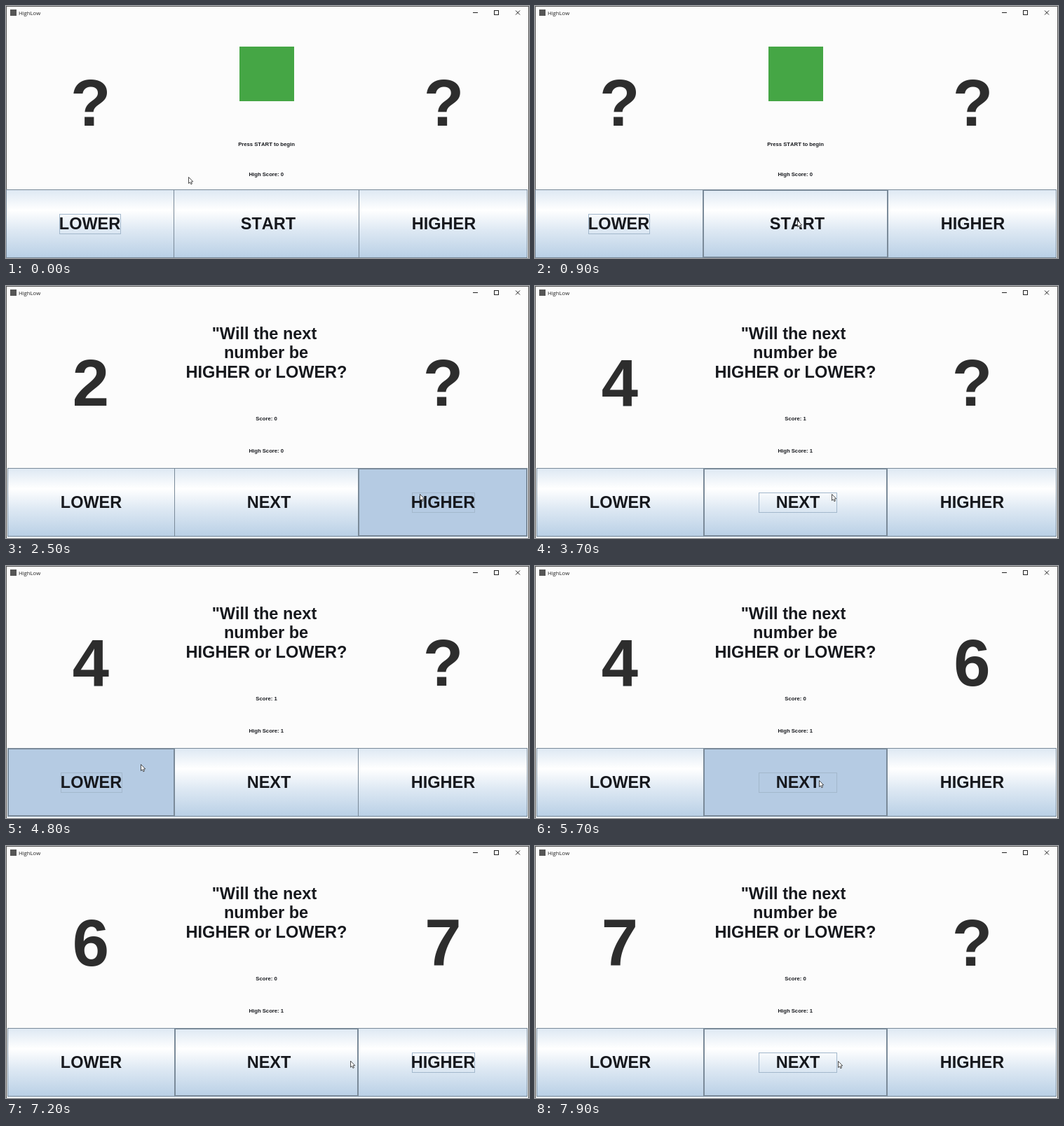
Recreate the animation shown at these times as an HTML page with a canvas. Size 746 by 360 pixels, loop 8000 ms.

```html
<!DOCTYPE html>
<html lang="en">
<head>
<meta charset="utf-8">
<title>HighLow</title>
<style>
html, body { margin: 0; width: 100%; height: 100%; overflow: hidden; background: #fcfcfc; }
canvas { display: block; }
</style>
</head>
<body>
<canvas id="stage" width="746" height="360"></canvas>
<script>
const ctx = document.getElementById('stage').getContext('2d');
const LOOP = 8000, INK = '#16181d', SANS = '"Liberation Sans", Arial, sans-serif';

// Pointer path: time, x, y of the tip
const path = [
  [0, 260, 244], [200, 260, 244], [800, 374, 306], [1100, 374, 306],
  [1600, 378, 63], [1750, 378, 63], [2300, 590, 297], [2650, 590, 297],
  [3250, 423, 297], [3800, 423, 297], [4500, 192, 283], [4950, 192, 283],
  [5550, 405, 306], [5850, 405, 306], [6300, 520, 307], [6550, 590, 306],
  [6850, 590, 306], [7450, 432, 307], [8000, 432, 307]
];

// Clicks: press time, release time, button index
const clicks = [
  [1000, 1100, 1], [2400, 2600, 2], [3400, 3500, 1], [4700, 4900, 0],
  [5700, 5800, 1], [6650, 6800, 2], [7550, 7650, 1]
];

// Game states: start time, left, right, score, high score
const states = [
  [0, '?', '?', 0, 0], [1100, '2', '?', 0, 0], [2600, '2', '4', 1, 1],
  [3500, '4', '?', 1, 1], [4900, '4', '6', 0, 1], [5800, '6', '?', 0, 1],
  [6800, '6', '7', 0, 1], [7650, '7', '?', 0, 1]
];

const layouts = {
  start: { top: 262, edges: [0, 239, 503, 744], mids: [119.5, 374, 624.5] },
  play: { top: 260, edges: [2, 240, 502, 744], mids: [121.5, 375, 623.5] }
};

const last = (list, t) => list.filter(item => item[0] <= t).pop();

function pointerAt(t) {
  const i = path.findIndex(p => p[0] > t);
  const [t0, x0, y0] = path[i - 1], [t1, x1, y1] = path[i];
  const u = (t - t0) / (t1 - t0), k = u * u * (3 - 2 * u);
  return [x0 + (x1 - x0) * k, y0 + (y1 - y0) * k];
}

function text(str, x, y, size, color = INK) {
  ctx.font = `bold ${size}px ${SANS}`;
  ctx.textAlign = 'center';
  ctx.fillStyle = color;
  ctx.fillText(str, x, y);
}

function box(x, y, w, h, color, line = 1) {
  ctx.strokeStyle = color;
  ctx.lineWidth = line;
  ctx.strokeRect(x + line / 2, y + line / 2, w - line, h - line);
}

function drawFrame() {
  ctx.fillStyle = '#fcfcfc';
  ctx.fillRect(0, 0, 746, 360);
  ctx.fillStyle = '#555';
  ctx.fillRect(0, 0, 746, 1);
  ctx.fillRect(0, 0, 1, 360);
  ctx.fillRect(745, 0, 1, 360);
  ctx.fillRect(6, 5, 9, 9);
  ctx.font = '7.7px "Open Sans", sans-serif';
  ctx.textAlign = 'left';
  ctx.fillStyle = '#222';
  ctx.fillText('HighLow', 18, 12.5);
  ctx.fillRect(666, 9, 7, 1);
  box(696, 6, 7, 7, '#222');
  ctx.beginPath();
  ctx.moveTo(727, 6.5);
  ctx.lineTo(733, 12.5);
  ctx.moveTo(733, 6.5);
  ctx.lineTo(727, 12.5);
  ctx.stroke();
}

function drawButton(i, label, layout, pressed, hover, focused) {
  const { top, edges, mids } = layout;
  const x = edges[i], w = edges[i + 1] - x + (i < 2 ? 1 : 0), h = 98.5;
  const fill = ctx.createLinearGradient(0, top, 0, top + h);
  [[0, '#dde8f3'], [0.3, '#ffffff'], [0.6, '#dde8f3'], [1, '#b8cfe5']]
    .forEach(stop => fill.addColorStop(...stop));
  ctx.fillStyle = pressed ? '#b5cbe3' : fill;
  ctx.fillRect(x, top, w, h);
  box(x, top, w, Math.floor(h), '#7a8a99', hover ? 2 : 1);
  if (focused) {
    const half = i === 1 ? 56 : i ? 45 : 44;
    box(Math.round(mids[i] - half), top + 35, half * 2, 29, '#a3b8cc');
  }
  text(label, mids[i], top + 57, 23.5);
}

function drawPointer(x, y) {
  const shape = [[0, 0], [0, 9], [2, 7.2], [3.4, 10.2], [4.9, 9.5], [3.6, 6.6], [6.2, 6.4]];
  ctx.beginPath();
  shape.forEach(([dx, dy]) => ctx.lineTo(x + 0.5 + dx, y + 0.5 + dy));
  ctx.closePath();
  ctx.fillStyle = '#fff';
  ctx.fill();
  ctx.strokeStyle = '#222';
  ctx.lineWidth = 0.8;
  ctx.stroke();
}

function draw(t) {
  const [, left, right, score, high] = last(states, t);
  const started = t >= 1100;
  const layout = started ? layouts.play : layouts.start;
  const [px, py] = pointerAt(t);
  const click = last(clicks, t);
  const focus = click ? click[2] : 0;
  const down = click && t < click[1];

  drawFrame();
  text(left, 120.8, 171, 94, '#2d2d2d');
  text(right, started ? 623.5 : 624.5, 171, 94, '#2d2d2d');
  if (started) {
    text('"Will the next', 368.5, 76, 23.5);
    text('number be', 371, 103, 23.5);
    text('HIGHER or LOWER?', 371.5, 130.5, 23.5);
    text('Score: ' + score, 371.5, 192.3, 7.7);
  } else {
    ctx.fillStyle = '#45a645';
    ctx.fillRect(333, 58, 78, 78);
    text('Press START to begin', 371.5, 200.3, 7.7);
  }
  text('High Score: ' + high, 371.3, started ? 238.3 : 243.3, 7.7);

  ['LOWER', started ? 'NEXT' : 'START', 'HIGHER'].forEach((label, i) => {
    const hover = py >= layout.top && px >= layout.edges[i] && px < layout.edges[i + 1];
    drawButton(i, label, layout, down && focus === i, hover, focus === i);
  });
  drawPointer(px, py);
}

ctx.fontKerning = 'none';
function tick() {
  draw(performance.now() % LOOP);
  requestAnimationFrame(tick);
}
tick();
</script>
</body>
</html>
```
